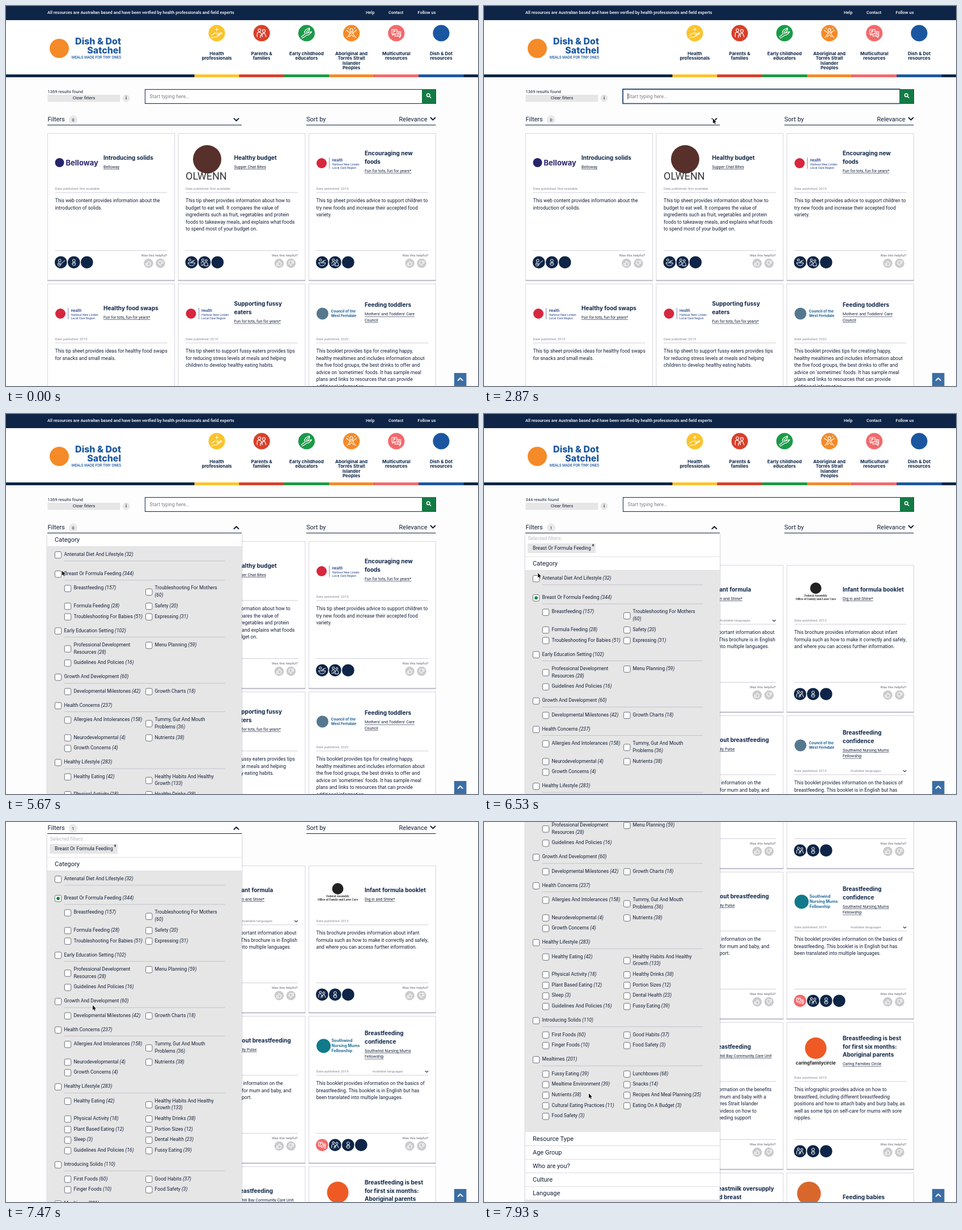
An HTML page with a canvas that plays this animation: 833 px wide and 672 px high, repeating every 8000 ms.

```html
<!DOCTYPE html>
<html lang="en">
<head>
<meta charset="utf-8">
<style>
  html, body { margin: 0; width: 100%; height: 100%; overflow: hidden; background: #fdfdfd; }
  canvas { display: block; }
</style>
</head>
<body>
<canvas id="stage" width="833" height="672"></canvas>
<script>
const ctx = document.getElementById('stage').getContext('2d');
const LOOP = 8000, NAVY = '#0e2547', INK = '#14203a', GRAY = '#e6e6e6', RULE = '#c3c3d2', BLUE = '#1b57a0';
const body = (size, weight = 400) => `${weight} ${size}px Roboto, sans-serif`;
const head = (size, weight = 700) => `${weight} ${size}px Inter, sans-serif`;

// Times of the hard changes and transitions, in ms
const FOCUS = 2470, OPEN = [3330, 3600], EXPAND = [4670, 4930], CHECK = 5850, FILTER = 6200, LOGO = 6700;
const LIST_H = 717;

const scrollKeys = [[6830, 0], [7070, 143], [7300, 190], [7500, 190], [7930, 445]];
const cursorKeys = [
  [1600, 420, 680], [2400, 300, 158], [2490, 300, 158], [2860, 404, 199], [3800, 404, 199],
  [4550, 148, 226], [5270, 148, 226], [5750, 95, 281], [6560, 95, 281], [6850, 153, 324],
  [7560, 153, 324], [7930, 185, 480]];

function ease(t, a, b) {
  const k = Math.min(1, Math.max(0, (t - a) / (b - a)));
  return k * k * (3 - 2 * k);
}

function track(keys, t, i = 1) {
  let v = keys[0][i];
  for (let n = 1; n < keys.length; n++) {
    v += (keys[n][i] - keys[n - 1][i]) * ease(t, keys[n - 1][0], keys[n][0]);
  }
  return v;
}

function text(str, x, y, font, color = INK, align = 'left') {
  ctx.font = font;
  ctx.fillStyle = color;
  ctx.textAlign = align;
  ctx.textBaseline = 'middle';
  ctx.fillText(str, x, y);
  return ctx.measureText(str).width;
}

function rect(x, y, w, h, color) {
  ctx.fillStyle = color;
  ctx.fillRect(x, y, w, h);
}

function disc(x, y, r, color) {
  ctx.fillStyle = color;
  ctx.beginPath();
  ctx.arc(x, y, r, 0, Math.PI * 2);
  ctx.fill();
}

function stroke(path, x, y, color, width = 1, sx = 1, sy = sx) {
  ctx.save();
  ctx.translate(x, y);
  ctx.scale(sx, sy);
  ctx.strokeStyle = color;
  ctx.lineWidth = width;
  ctx.lineJoin = ctx.lineCap = 'round';
  ctx.stroke(new Path2D(path));
  ctx.restore();
}

function frame(x, y, w, h, color, width = 1) {
  ctx.strokeStyle = color;
  ctx.lineWidth = width;
  ctx.strokeRect(x, y, w, h);
}

const chevron = (x, y, up, size = 1, color = INK) =>
  stroke('M-4 -2L0 2L4 -2', x, y, color, 1.9, size, up ? -size : size);

const ring = (x, y, r) => `M${x - r} ${y}a${r} ${r} 0 1 1 ${2 * r} 0a${r} ${r} 0 1 1 ${-2 * r} 0`;

const icons = {
  spoon: ring(-2, -3, 2.4) + 'M-4 0q-3 5 0 6.5q4 1 4.5 -4L7 -3' + ring(-2, 3, 1.4),
  baby: ring(0, -3, 2.4) + ring(0, 2.8, 3) + 'M-1 2h2',
  bowl: 'M-6 1H6Q5 6 0 6T-6 1M1 0L6 -4M-1 0L3 -3' + ring(-3, -4, 2),
  people: ring(-3, -4, 2) + ring(3, -3, 1.8) + 'M-6 2q0 -3 3 -3t3 3M-6 5h4v-3M0 6q0 -6 3 -6t3 6z',
  family: ring(-3, -4, 1.9) + ring(3, -3, 1.9) + 'M-6 5v-5q3 -3 6 1l-2 5M1 5q-1 -6 3 -5l2 5M-2 3l4 -2',
  lang: 'M-6 -5H1V1H-3L-5 3V1H-6ZM2 -2H6V4H5V6L3 4H-2V2M-4 -3H-1M-2.5 -4V-3L-4 0M2 3l1.5 -4l1.5 4',
  plain: '',
  care: 'M-7 3L-3 0H2Q3 2 0 2.5M-7 6L0 5L7 0Q6 -2 2 2M-2 -5H2M0 -7V-3',
  sprout: 'M-7 5L-2 1L7 -2Q5 2 0 3L-6 7M-3 0Q-3 -5 4 -7Q5 -2 0 0M-1 -1L4 -6',
  dance: ring(0, -4, 2) + 'M-7 -4Q-2 0 0 0T7 -4M-2 0Q-3 3 -6 6M2 0Q3 3 6 6M-3 5L0 2L3 5M-5 -7l1 1M5 -7l-1 1',
  thumb: 'M-4 0H-2V4H-4ZM-2 0L0 -4Q2 -4 1 -1H4L3 4H-2'
};

const nav = [
  ['#fbc32d', 'care', 'Health', 'professionals'],
  ['#d8402b', 'family', 'Parents &', 'families'],
  ['#1b9a48', 'sprout', 'Early childhood', 'educators'],
  ['#f58a28', 'dance', 'Aboriginal and', 'Torres Strait', 'Islander', 'Peoples'],
  ['#f2696b', 'lang', 'Multicultural', 'resources'],
  [BLUE, 'plain', 'Dish & Dot', 'resources']];

// A logo is one disc [color, x, y, r] followed by lines [text, x, y, font, color]
const logos = {
  bello: [['#27256b', 21, 52, 8], ['Belloway', 32, 53, head(13), '#27256b']],
  olwenn: [['#57302b', 51, 46, 25], ['OLWENN', 13, 77, body(18), '#333']],
  harbour: [['#d7263d', 22.5, 53, 9], ['Health', 41, 48, body(6.4, 500), '#23408f'],
    ['Harbour New Linden', 41, 55.5, body(5.3), '#23408f'], ['Local Care Region', 41, 61, body(5.3), '#23408f']],
  ferndale: [['#56788f', 24, 53, 10.5], ['Council of the', 39, 49, head(6.4), '#1f5a94'],
    ['West Ferndale', 39, 57, head(6.4), '#1f5a94']],
  commons: [['#222', 51, 41, 10], ['Federal Assembly', 51, 55, '700 4.5px "Noto Serif", serif', '#222'],
    ['Office of Family and Later Care', 51, 61, '700 4.5px "Noto Serif", serif', '#222']],
  southwind: [['#107a8b', 26, 53, 12.5], ['Southwind', 40, 44, head(7), '#1d6a98'],
    ['Nursing Mums', 40, 53, head(7), '#1d6a98'], ['Fellowship', 40, 62, head(7), '#1d6a98']],
  caring: [['#ef5a24', 51, 46, 19], ['caringfamilycircle', 51, 73, head(8), '#222']],
  petal: [['#d9672b', 39, 37, 21]]
};

const TOTS = ['Fun for tots, fun for years*'], THREE = ['family', 'baby', 'plain'], MEAL = ['bowl', 'people', 'plain'];
const card = (col, row, logo, title, link, date, lines, marks, extra) =>
  ({ col, row, logo, title, link, date, lines, marks, ...extra });

const startCards = [
  card(0, 0, 'bello', ['Introducing solids'], ['Belloway'], 'Not available',
    ['This web content provides information about the', 'introduction of solids.'], ['spoon', 'baby', 'plain']),
  card(1, 0, 'olwenn', ['Healthy budget'], ['Supper Chat Bites'], 'Not available',
    ['This tip sheet provides information about how to', 'budget to eat well. It compares the value of',
      'ingredients such as fruit, vegetables and protein', 'foods to takeaway meals, and explains what foods',
      'to spend most of your budget on.'], MEAL),
  card(2, 0, 'harbour', ['Encouraging new', 'foods'], TOTS, '2019',
    ['This tip sheet provides advice to support children to', 'try new foods and increase their accepted food', 'variety.'], MEAL),
  card(0, 1, 'harbour', ['Healthy food swaps'], TOTS, '2019',
    ['This tip sheet provides ideas for healthy food swaps', 'for snacks and small meals.'], MEAL),
  card(1, 1, 'harbour', ['Supporting fussy', 'eaters'], TOTS, '2019',
    ['This tip sheet to support fussy eaters provides tips', 'for reducing stress levels at meals and helping',
      'children to develop healthy eating habits.'], MEAL),
  card(2, 1, 'ferndale', ['Feeding toddlers'], ["Mothers' and Toddlers' Care", 'Council'], '2022',
    ['This booklet provides tips for creating happy,', 'healthy mealtimes and includes information about',
      'the five food groups, the best drinks to offer and', "advice on 'sometimes' foods. It has sample meal",
      'plans and links to resources that can provide', 'additional information.'], MEAL)];

// The middle column is mostly covered by the filter panel, so its lines start further right
const foundCards = [
  card(1, 0, '', ['Infant formula'], ['Dig in and Shine*'], '2013',
    ['portant information about', 'This brochure is in English', 'nto multiple languages.'], THREE, { inset: 110, langs: true }),
  card(2, 0, 'commons', ['Infant formula booklet'], ['Dig in and Shine*'], '2013',
    ['This brochure provides information about infant', 'formula such as how to make it correctly and safely,',
      'and where you can access further information.'], THREE),
  card(1, 1, '', ['About breastfeeding'], ['Family Pulse'], '2019',
    [' information on the', 'for mum and baby, and', 'port.'], THREE, { inset: 112 }),
  card(2, 1, 'southwind', ['Breastfeeding', 'confidence'], ['Southwind Nursing Mums', 'Fellowship'], '2019',
    ['This booklet provides information on the basics of', 'breastfeeding. This booklet is in English but has',
      'been translated into multiple languages.'], ['lang', ...THREE], { langs: true }),
  card(1, 2, '', ['Breastfeeding'], ['Fernhill Bay Community Care Unit'], '2019',
    ['ormation on the benefits', ' mum and baby with a', 'rres Strait Islander', ' videos on how to', 'eeding support'],
    THREE, { inset: 110 }),
  card(2, 2, 'caring', ['Breastfeeding is best', 'for first six months:', 'Aboriginal parents'], ['Caring Families Circle'], '2019',
    ['This infographic provides advice on how to', 'breastfeed, including different breastfeeding',
      'positions and how to attach baby and burp baby, as', 'well as some tips on self-care for mums with sore', 'nipples.'], THREE),
  card(1, 3, '', ['Breastmilk oversupply', 'and breast', 'engorgement'], ['Family Pulse'], '2019', [], THREE),
  card(2, 3, 'petal', ['Feeding babies'], ['Dig in and Shine*'], '2019', [], THREE)];

// Each group: heading, then rows of one or two cells; "/" breaks a line
const groups = [
  ['Antenatal Diet And Lifestyle (32)'],
  ['Breast Or Formula Feeding (344)', 'Breastfeeding (157)|Troubleshooting For Mothers/(60)',
    'Formula Feeding (28)|Safety (20)', 'Troubleshooting For Babies (51)|Expressing (31)'],
  ['Early Education Setting (102)', 'Professional Development/Resources (28)|Menu Planning (59)', 'Guidelines And Policies (16)'],
  ['Growth And Development (60)', 'Developmental Milestones (42)|Growth Charts (18)'],
  ['Health Concerns (237)', 'Allergies And Intolerances (158)|Tummy, Gut And Mouth/Problems (36)',
    'Neurodevelopmental (4)|Nutrients (38)', 'Growth Concerns (4)'],
  ['Healthy Lifestyle (283)', 'Healthy Eating (42)|Healthy Habits And Healthy/Growth (133)',
    'Physical Activity (18)|Healthy Drinks (38)', 'Plant Based Eating (12)|Portion Sizes (12)',
    'Sleep (3)|Dental Health (23)', 'Guidelines And Policies (16)|Fussy Eating (39)'],
  ['Introducing Solids (110)', 'First Foods (60)|Good Habits (37)', 'Finger Foods (10)|Food Safety (3)'],
  ['Mealtimes (201)', 'Fussy Eating (39)|Lunchboxes (68)', 'Mealtime Environment (39)|Snacks (14)',
    'Nutrients (38)|Recipes And Meal Planning (25)', 'Cultural Eating Practices (11)|Eating On A Budget (3)', 'Food Safety (3)']];

function drawHeader() {
  rect(0, 0, 833, 25, NAVY);
  const small = body(7.5, 500);
  text('All resources are Australian based and have been verified by health professionals and field experts', 73, 12, small, '#fff');
  text('Help', 635, 12, small, '#fff');
  text('Contact', 675, 12, small, '#fff');
  text('Follow us', 758.5, 12, small, '#fff', 'right');
  rect(0, 25, 833, 97, '#fff');
  disc(94, 75, 17, '#f58a28');
  text('Dish & Dot', 203, 63, head(16, 800), BLUE, 'right');
  text('Satchel', 203, 79, head(16, 800), BLUE, 'right');
  text('MEALS MADE FOR TINY ONES', 203, 91.5, body(6.4, 500), BLUE, 'right');
  rect(0, 121, 833, 5, NAVY);
  nav.forEach(([color, icon, ...lines], i) => {
    const x = 372 + i * 79.2;
    disc(x, 48, 14.6, color);
    stroke(icons[icon], x, 48, '#fff', 0.9, 1.3);
    lines.forEach((line, n) => text(line, x, 84.8 + n * 8.2, head(8), NAVY, 'center'));
    rect(x - 39.5, 121, 79.3, 5, color);
  });
}

function drawTools(t) {
  const focus = t >= FOCUS && t < OPEN[0], found = t >= FILTER, open = t >= OPEN[0];
  text(found ? '344 results found' : '1369 results found', 73.5, 152, body(7.5));
  rect(73.5, 157, 128, 12.5, GRAY);
  text('Clear filters', 137.5, 163, body(7.8), INK, 'center');
  disc(212, 163, 6.5, GRAY);
  text('i', 212, 163, body(8, 700), INK, 'center');
  rect(245, 147, 513, 25, '#fff');
  frame(245.5, 147.5, 513, 25, NAVY);
  if (focus) frame(245, 147, 489, 25.5, '#27496f', 1.6);
  rect(734, 147, 24.5, 25.5, '#147a45');
  stroke(ring(-0.8, -0.8, 2.7) + 'M1.3 1.3L3.8 3.8', 746, 158.5, '#fff', 1.6);
  text('Start typing here...', 253.5, 160, body(8.7), '#7b7f88');
  if (focus && t < 3070) rect(253.5, 154, 0.8, 11, INK);
  text('Filters', 73.5, 201, body(11));
  disc(118.5, 201, 7.5, '#e9e9ea');
  text(found ? '1' : '0', 118.5, 201.5, body(8), INK, 'center');
  chevron(406.5, 201, open);
  rect(73, 210, 343, 1, INK);
  text('Sort by', 530, 201, body(11));
  text('Relevance', 743.5, 201, body(11), INK, 'right');
  chevron(753.5, 199.5, false);
  rect(530, 210, 228.5, 1, INK);
}

function drawCard(c, top, t) {
  const x = 73.5 + c.col * 230.5, y = top + c.row * 266;
  rect(x, y, 224, 260, '#fff');
  frame(x, y + 0.5, 224, 260, '#d6d7e2');
  rect(x - 0.5, y + 259.5, 225, 1.8, '#b2b4c2');

  const logo = c.logo === 'southwind' && t < LOGO ? 'ferndale' : c.logo;
  if (logo) {
    const [[color, lx, ly, r], ...lines] = logos[logo];
    disc(x + lx, y + ly, r, color);
    lines.forEach(([str, tx, ty, font, ink]) => text(str, x + tx, y + ty, font, ink, tx === 51 ? 'center' : 'left'));
    if (logo === 'harbour') rect(x + 36, y + 43, 0.6, 20, '#23408f');
  }

  let line = y + 43.5 - 7.2 * (c.title.length - 1) - 5.2 * (c.link.length - 1);
  c.title.forEach((str, i) => text(str, x + 98.5, line + i * 14.5, head(10), NAVY));
  line += (c.title.length - 1) * 14.5 + 16;
  c.link.forEach((str, i) => {
    const w = text(str, x + 98.5, line + i * 10.5, body(7.1));
    rect(x + 98.5, line + i * 10.5 + 3.7, w, 0.6, INK);
  });

  text('Date published: ' + c.date, x + 13, y + 98.5, body(6.1), '#858893');
  if (c.langs) {
    text('Available languages', x + 112, y + 98.5, body(6.1), '#858893');
    chevron(x + 208, y + 98.5, false, 0.6);
  }
  rect(x + 13, y + 104.5, 198, 0.8, RULE);
  c.lines.forEach((str, i) => text(str, x + (c.inset || 13), y + 119.5 + i * 12.5, body(8.6)));
  rect(x + 13, y + 207, 198, 0.8, RULE);
  text('Was this helpful?', x + 211, y + 216, body(6.1), '#63666f', 'right');
  c.marks.forEach((name, i) => {
    const ix = x + 23.3 + i * 23;
    disc(ix, y + 228.2, 10.8, name === 'lang' ? '#f2696b' : NAVY);
    stroke(icons[name], ix, y + 228.2, '#fff', 1);
  });
  [1, -1].forEach((dir, i) => {
    disc(x + 178 + i * 21, y + 230, 8.3, '#cbcbcd');
    stroke(icons.thumb, x + 178 + i * 21, y + 230, '#fff', 1, dir);
  });
}

function checkbox(x, y, on) {
  ctx.fillStyle = '#fff';
  ctx.strokeStyle = '#6d7078';
  ctx.lineWidth = 1;
  ctx.beginPath();
  ctx.roundRect(x - 5.7, y - 5.7, 11.4, 11.4, 2.2);
  ctx.fill();
  ctx.stroke();
  if (on) disc(x, y, 2.9, '#128a42');
}

function label(str, x, y) {
  str.split('/').forEach((line, i) => {
    const cut = line.indexOf('('), name = cut < 0 ? line : line.slice(0, cut);
    const w = text(name, x, y + i * 12.6, body(8.55));
    if (cut >= 0) text(line.slice(cut), x + w, y + i * 12.6, 'italic ' + body(8.55));
  });
}

function drawGroups(y, t) {
  groups.forEach(([title, ...rows], g) => {
    checkbox(92, y + 0.7, g === 1 && t >= CHECK);
    label(title, 102.5, y);
    rect(102.5, y + 11, 284, 0.8, '#b9b9c9');
    y += rows.length ? 25.4 : 34;
    rows.forEach((row, r) => {
      row.split('|').forEach((cell, i) => {
        checkbox(109 + i * 143.3, y + (cell.includes('/') ? 7 : 0.7));
        label(cell, 119.5 + i * 143, y);
      });
      y += row.includes('/') ? 31.4 : r < rows.length - 1 ? 18.7 : 25;
    });
  });
}

function drawPanel(t) {
  const open = ease(t, ...OPEN);
  if (!open) return;
  const shift = t >= FILTER ? 42 : 0, list = LIST_H * ease(t, ...EXPAND);
  const height = (164.5 + shift + list) * open;
  ctx.save();
  ctx.shadowColor = 'rgba(30,40,70,.35)';
  ctx.shadowBlur = 3;
  ctx.shadowOffsetY = 1;
  rect(73, 211, 343, height, '#fff');
  ctx.restore();
  ctx.save();
  ctx.beginPath();
  ctx.rect(73, 211, 343, height);
  ctx.clip();
  if (shift) {
    text('Selected filters:', 77.5, 220.5, body(8.8), '#b9bac2');
    rect(77, 229, 120, 17, GRAY);
    text('Breast Or Formula Feeding', 86, 237.5, body(8.7));
    text('x', 192.5, 232, body(7, 700), INK, 'center');
    rect(73, 252, 343, 0.8, '#dedee6');
  }
  ['Category', 'Resource Type', 'Age Group', 'Who are you?', 'Culture', 'Language'].forEach((name, i) => {
    const y = 222.5 + shift + i * 24 + (i ? list : 0);
    text(name, 86, y, body(11));
    rect(73, y + 11.7, 343, 0.8, '#d3d3de');
  });
  rect(73, 355 + shift + list, 343, 20, GRAY);
  text('Apply filters', 244.5, 365 + shift + list, body(7.8), INK, 'center');
  ctx.beginPath();
  ctx.rect(73, 234.5 + shift, 343, list);
  ctx.clip();
  rect(73, 234.5 + shift, 343, list, GRAY);
  if (list) drawGroups(248.5 + shift, t);
  ctx.restore();
}

function drawCursor(t) {
  if (t < cursorKeys[0][0]) return;
  const hand = t > 4200 && t < 5400;
  const path = new Path2D(hand
    ? 'M-1 0Q0 -1.5 1 0V3L4.5 4V7L3.5 9.5H-1L-3.5 5.5Q-3 4 -1 5.5Z'
    : 'M0 0V8.5L2 6.7L3.4 9.8L4.8 9.2L3.4 6.2H6Z');
  ctx.save();
  ctx.translate(track(cursorKeys, t, 1), track(cursorKeys, t, 2));
  ctx.lineWidth = hand ? 1 : 1.4;
  ctx.strokeStyle = hand ? '#111' : '#fff';
  ctx.fillStyle = hand ? '#fff' : '#111';
  ctx.stroke(path);
  ctx.fill(path);
  ctx.restore();
}

function draw(t) {
  const found = t >= FILTER;
  rect(0, 0, 833, 672, '#fdfdfd');
  ctx.save();
  ctx.translate(0, -Math.round(track(scrollKeys, t)));
  drawHeader();
  drawTools(t);
  (found ? foundCards : startCards).forEach(c => drawCard(c, found ? 267 : 225, t));
  drawPanel(t);
  ctx.restore();
  rect(791, 649, 21.5, 23, '#3a6ea5');
  chevron(801.7, 660, true, 1, '#fff');
  drawCursor(t);
}

const start = performance.now();
function tick() {
  draw((performance.now() - start) % LOOP);
  requestAnimationFrame(tick);
}
tick();
</script>
</body>
</html>
```
